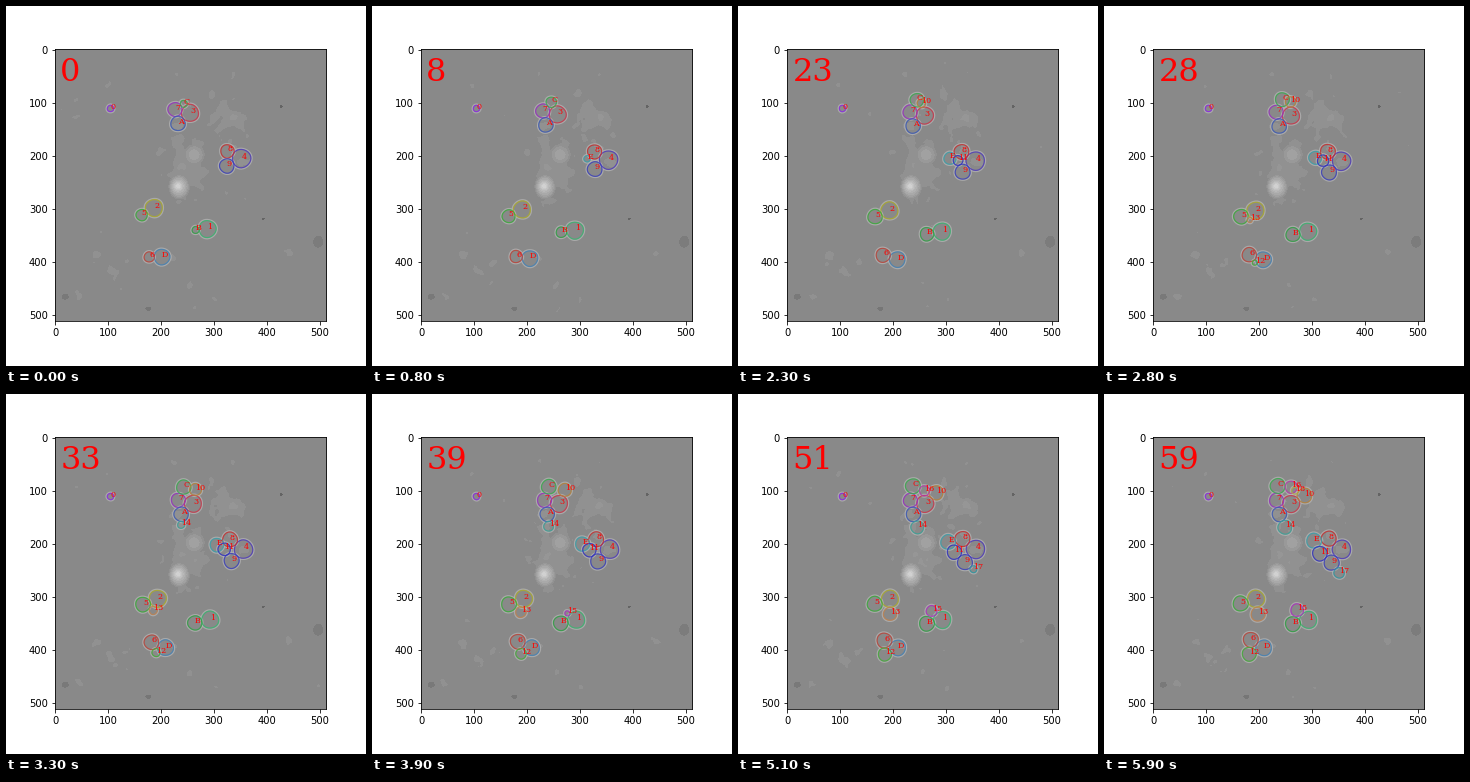
A matplotlib script that plays this animation: 360x360 px, repeating every 6 s.

```python
import numpy as np
import matplotlib.pyplot as plt
from matplotlib.animation import FuncAnimation
from matplotlib.collections import PolyCollection

FRAMES, STEP = 60, 100
LEFT, TOP, SIDE = 48.8, 43.3, 271.4      # axes box on the stage, in pixels
GRID = 272

# label: colour, x, y, radius (stage pixels at the start)
FOUNDERS = {
    "0": ("blueviolet", 104.5, 102.5, 3.2),
    "1": ("mediumseagreen", 201.5, 223, 8.5),
    "2": ("#aaaa2d", 148, 202, 8.5),
    "3": ("#c8374b", 184, 107, 8.5),
    "4": ("#503cb9", 235.5, 152.5, 9.2),
    "7": ("#9632be", 169, 103.5, 7),
    "A": ("#3c5ab4", 172, 117.5, 7.2),
    "D": ("steelblue", 156, 251, 7.8),
}

# label: colour, mother, first frame, direction from the mother (first, last)
DAUGHTERS = {
    "5": ("#3caa3c", "2", -14, 150, 163),
    "6": ("#b9463c", "D", -10, 180, 212),
    "8": ("#c33232", "4", -25, 207, 220),
    "9": ("#3c41b9", "4", -40, 153, 127),
    "B": ("#32a046", "1", -3, 175, 165),
    "C": ("#3caa50", "7", -3, -33, -85),
    "E": ("#3ca0aa", "8", 6, 133, 172),
    "11": ("#3232be", "9", 14, 262, 218),
    "10": ("#b4823c", "3", 17, 230, 328),
    "13": ("#be8250", "2", 28, 122, 82),
    "12": ("#46aa3c", "6", 28, 55, 96),
    "14": ("#3ca096", "A", 30, 97, 67),
    "15": ("#aa32be", "1", 39, 216, 221),
    "16": ("#b43caa", "C", 41, 55, 5),
    "17": ("#3296a0", "9", 48, 30, 53),
    "18": ("#b4aa46", "10", 56, 207, 207),
}
CELLS = {**FOUNDERS, **DAUGHTERS}
turn = np.linspace(0, 2 * np.pi, 33)


def to_data(x, y):
    scale = 512 / SIDE
    return (x - LEFT) * scale - 0.5, (y - TOP) * scale - 0.5


def born(label, n):
    return label in FOUNDERS or n >= DAUGHTERS[label][2]


def pose(label, n):
    """Centre and radius of a cell; daughters are pushed out as they grow."""
    if label in FOUNDERS:
        _, x, y, r = FOUNDERS[label]
        settle = 0 if label == "0" else 1 - np.exp(-n / 11)
        # cells further left slide further
        return x + settle * (336 - x) / 48, y + settle * 2.9, r
    _, mother, birth, first, last = DAUGHTERS[label]
    x, y, size = pose(mother, n)
    r = 2.5 + 5 * (1 - np.exp(-(n - birth) / 14))
    start = max(birth, 0)
    u = (n - start) / (FRAMES - 1 - start)
    a = np.radians(first + (last - first) * u ** 0.7)
    return x + (size + r) * np.cos(a), y + (size + r) * np.sin(a), r


def outline(x, y, r, phase):
    r = r * (1 + 0.025 * np.sin(3 * turn + phase))
    return np.column_stack(to_data(x + r * np.cos(turn), y + r * np.sin(turn)))


# ---- microscope background ----

cols, rows = np.meshgrid(LEFT + np.arange(GRID) + 0.5, TOP + np.arange(GRID) + 0.5)


def spread(cx, cy, sx, sy):
    return ((cols - cx) / sx) ** 2 + ((rows - cy) / sy) ** 2


def noise(seed, size):
    raw = np.random.default_rng(seed).normal(size=(GRID, GRID))
    f = np.fft.fftfreq(GRID)
    mask = np.exp(-2 * (np.pi * size) ** 2 * (f[:, None] ** 2 + f ** 2))
    soft = np.fft.ifft2(np.fft.fft2(raw) * mask).real
    return soft / soft.std()


HAZE = [(180, 165, 21, 26, 0.85), (222, 100, 19, 21, 0.42),
        (230, 135, 13, 38, 0.25), (108, 255, 15, 25, 0.35),
        (68, 107, 9, 9, 0.42)]
SPOTS = [(312, 236, 5, 6, 124), (59, 291, 3.5, 3, 122), (142, 303, 2.8, 2.2, 118),
         (275, 101, 1.5, 1.5, 100), (257, 213, 1.4, 1.2, 100)]

haze = 0.16 * noise(4, 3.5)
for *place, power in HAZE:
    haze += power * np.exp(-spread(*place) / 2)

glow = (26 * np.exp(-spread(188, 149, 10, 10) ** 2)
        + 34 * np.exp(-spread(173, 181, 10, 12) ** 3)
        + 45 * np.exp(-spread(172, 180.5, 5, 5)))


def backdrop(n):
    field = haze + 0.05 * noise(100 + n, 1.5)
    img = 137 + 8.0 * (field > 0.5) + 5 * (field > 1)
    img = np.maximum(img, 137 + 8 * np.floor(glow / 8))
    for *place, level in SPOTS:
        img[spread(*place) < 1] = level
    return img


# ---- stage ----

fig = plt.figure(figsize=(5, 5), dpi=72, facecolor="white")
ax = fig.add_axes([LEFT / 360, 1 - (TOP + SIDE) / 360, SIDE / 360, SIDE / 360])
picture = ax.imshow(backdrop(0), cmap="gray", vmin=0, vmax=255,
                    interpolation="nearest", extent=(-0.5, 511.5, 511.5, -0.5))
ax.set_xticks(range(0, 501, 100))
ax.set_yticks(range(0, 501, 100))


def shapes(**style):
    return ax.add_collection(PolyCollection([], **style), autolim=False)


def red_text(x, y, text, size):
    return ax.text(x, y, text, size=size, color="red", family="DejaVu Serif")


halos = shapes(facecolors="none", edgecolors="#b8b8b8", linewidths=1.4, alpha=0.7)
rings = shapes(facecolors="none", linewidths=1.2, alpha=0.85)
tags = {label: red_text(0, 0, label, 8) for label in CELLS}
counter = red_text(10, 60, "0", 32)


def draw(n):
    inner, outer, colors = [], [], []
    for i, (label, (color, *_)) in enumerate(CELLS.items()):
        tags[label].set_visible(born(label, n))
        if not born(label, n):
            continue
        x, y, r = pose(label, n)
        phase = 2.1 * i + 0.9 * n
        inner.append(outline(x, y, r, phase))
        outer.append(outline(x, y, r + 1.1, phase))
        colors.append(color)
        tags[label].set_position(to_data(x, y))
    picture.set_data(backdrop(n))
    halos.set_verts(outer)
    rings.set_verts(inner)
    rings.set_edgecolor(colors)
    counter.set_text(str(n))
    return picture, halos, rings, counter, *tags.values()


anim = FuncAnimation(fig, draw, frames=FRAMES, interval=STEP, repeat=True)
plt.show()
```
